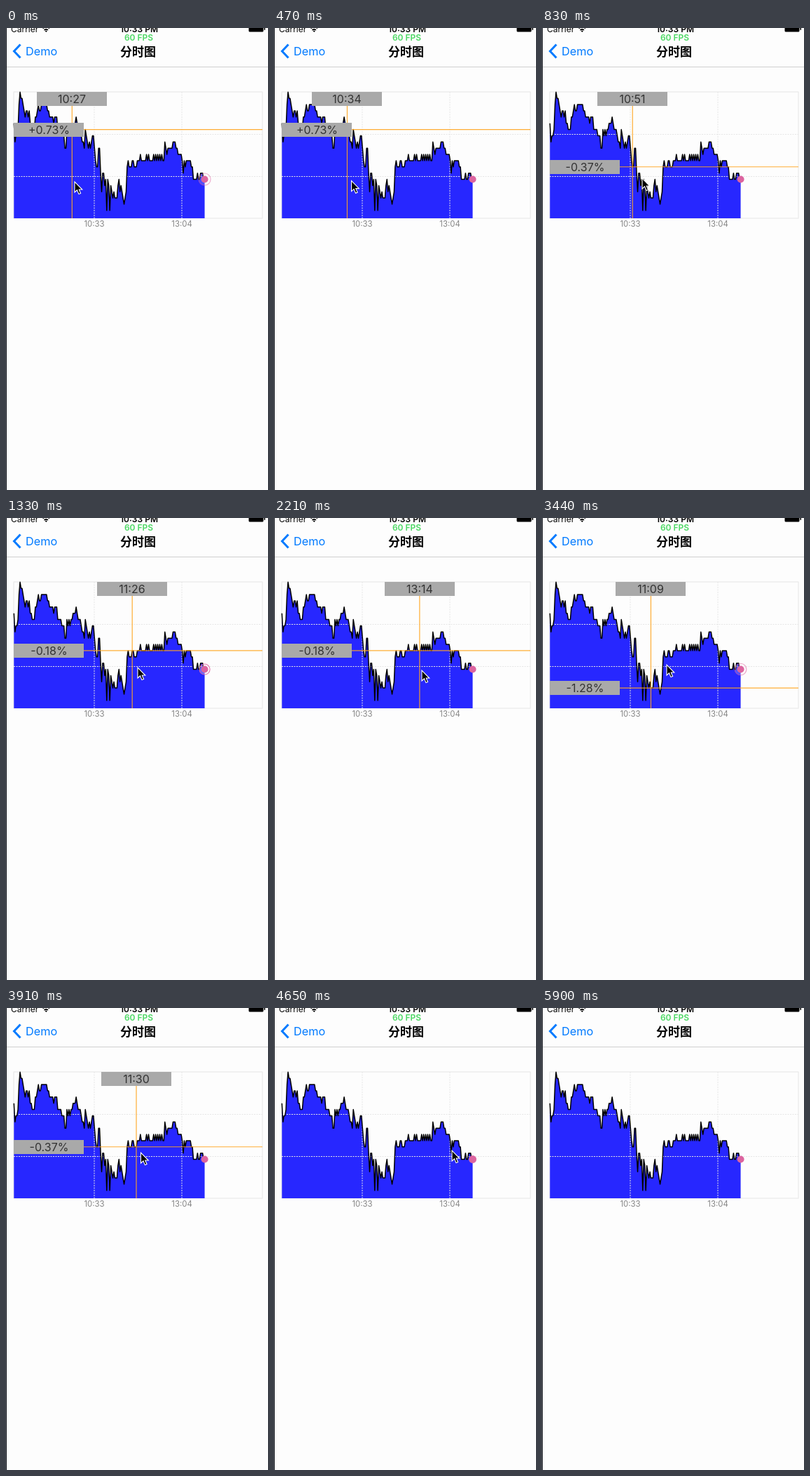
An HTML page for the animation above (6040 ms loop, 374 by 658 pixels).

```html
<!DOCTYPE html>
<html lang="zh">
<head>
<meta charset="utf-8">
<title>分时图</title>
<style>
  html, body { margin: 0; width: 100%; height: 100%; overflow: hidden; background: #fdfdfd; }
  svg { display: block; width: 374px; height: 658px; font-family: Inter, Roboto, sans-serif; }
  .mid { text-anchor: middle; }
  .axis { font-size: 11.4px; fill: #868686; }
  .grid { stroke: #e6e6e6; stroke-dasharray: 2 1.5; }
  .tag rect { fill: #a9a9a9; }
  .tag text { font-size: 16px; fill: #333; }
  .hair { stroke: #ffa51f; stroke-width: 1.2; opacity: .9; }
</style>
</head>
<body>
<svg viewBox="0 0 374 658">
  <rect width="374" height="658" fill="#fdfdfd"/>
  <rect y="55" width="374" height="1" fill="#cfcfcf"/>

  <text x="7" y="6" font-size="12">Carrier</text>
  <g fill="none" stroke="#000" stroke-width="1.6">
    <path d="M52.5 0.5Q57.5 -3 62 0.5M54.5 3Q57.3 0.8 60 3"/>
  </g>
  <path d="M55.7 4.2Q57.3 3 58.9 4.2L57.3 6Z"/>
  <text class="mid" x="190" y="6" font-size="12" font-weight="600">10:33 PM</text>
  <rect x="346.5" y="-4" width="21" height="9.5" rx="1.5"/>
  <rect x="368.5" y="-1" width="1.5" height="4" rx=".7"/>
  <text class="mid" x="189.5" y="18" font-size="12" font-weight="600" fill="#4cd964">60 FPS</text>

  <path d="M20.5 23.5L11.5 33L20.5 42.5" fill="none" stroke="#007aff" stroke-width="3"/>
  <text x="28" y="39" font-size="16.3" fill="#007aff">Demo</text>
  <text class="mid" x="188.5" y="39.5" font-size="17" font-weight="600"
        style="font-family:'Noto Sans CJK SC','Noto Sans CJK',sans-serif">分时图</text>

  <rect x="11" y="91" width="355" height="180" fill="none" stroke="#e6e6e6"/>
  <path id="area" fill="#2727ff"/>
  <path class="grid" d="M11 151.5H366M11 211.5H366M126 91V271M251 91V271"/>
  <path id="line" fill="none" stroke="#000" stroke-width="1.5" stroke-linejoin="round"/>
  <text class="axis mid" x="126" y="283">10:33</text>
  <text class="axis mid" x="251" y="283">13:04</text>

  <circle id="ring" fill="#fff" fill-opacity=".35" stroke="#e06aa4" stroke-width="1.2"/>
  <circle id="dot" r="5" fill="#dc649f"/>

  <g id="cross">
    <path id="vert" class="hair" d="M0 91V271"/>
    <path id="horiz" class="hair" d="M11 0H366"/>
    <g id="timeTag" class="tag"><rect x="-50" y="91" width="100" height="20"/><text class="mid" y="107"></text></g>
    <g id="pctTag" class="tag"><rect x="11" y="-10" width="100" height="20"/><text class="mid" x="61.5" y="5.8"></text></g>
  </g>

  <path id="cursor" d="M0 0V15L3.5 11.8L6 17.6L8.6 16.5L6.2 11H10.8Z" stroke="#fff" stroke-width="1.1"/>
  <rect width="1" height="658" fill="#15181f"/>
</svg>
<script>
const LOOP = 6040;
const $ = id => document.getElementById(id);
const move = (el, x, y) => el.setAttribute('transform', `translate(${x} ${y})`);

// Price ticks per minute; [level, count] is a flat stretch.
const levels = [
  6, 3, 4, 4, 5, 9, 11, 10, 10, 9, 8, 7, 8, 8, 7, 8, 6, 6, [5, 3],
  7, 7, 8, 9, 8, 8, [9, 6], 8, 8, [7, 4], 6, [7, 3], [5, 4], [4, 3],
  2, 2, 5, 4, 5, 4, 5, 5, [6, 3], 7, 6, [5, 3], 4, 3, 3, 2,
  5, 4, 3, 2, 3, 2, 3, 4, 4, 2, 0, -1, -1, 2, 2, -2, -5, -2, -2, -4, -3, -8,
  -3, -4, -8, -4, -5, -6, -5, [-6, 3], -4, -3, -5, -4, -5, -6, -7, -6, -5,
  -1, 0, [-1, 3], 0, 0, [-1, 3], [0, 27],
  3, 2, 1, [2, 5], [3, 3], 2, 2, [1, 4], 0, -2, 0, -1, [0, 5], -1, -1,
  [-3, 4], -2, -3, -3, [-2, 3], -3, -3
].flatMap(e => Array.isArray(e) ? Array(e[1]).fill(e[0]) : e);
// Small midday wobble
for (const i of [124, 130, 132]) levels[i] = 1;
for (let i = 137; i < 147; i += 2) levels[i] = 1;

const px = i => 11.3 + 1.456 * i;
const py = level => 188.9 - 8.87 * level;
const last = levels.length - 1;

const line = 'M' + levels.map((v, i) => `${px(i).toFixed(2)} ${py(v).toFixed(2)}`).join('L');
$('line').setAttribute('d', line);
$('area').setAttribute('d', `${line}V271H${px(0)}Z`);
for (const id of ['ring', 'dot']) move($(id), px(last), py(levels[last]));

// Screen updates: start, end, steps
const runs = [
  [60, 650, 10], [710, 1270, 11], [1330, 1920, 11], [2040, 2610, 12],
  [2670, 3260, 12], [3320, 3910, 11], [3970, 4150, 4], [4340, 4340, 1],
  [4480, 5050, 11], [5110, 5650, 11], [5740, 5740, 1]
];
function snap(t) {
  let at = 0;
  for (const [start, end, n] of runs) {
    if (t < start) break;
    const gap = n > 1 ? (end - start) / (n - 1) : 1;
    at = start + Math.min(n - 1, Math.floor((t - start + 4) / gap)) * gap;
  }
  return at;
}

const minuteKeys = [
  [0, 57], [650, 67], [822, 81], [1330, 116], [1920, 132], [2195, 135],
  [2610, 126], [3220, 82], [3438, 99], [3800, 128], [4150, 103]
];
const cursorKeys = [
  [0, 98, 219], [650, 116, 217], [822, 143, 214], [1330, 188, 213],
  [1920, 206, 216], [2195, 211, 217], [2610, 194, 214], [3220, 128, 212],
  [3438, 178, 209], [3800, 206, 206], [4150, 163, 206], [4423, 163, 206],
  [4651, 254, 203], [4800, 276, 42], [5050, 267, 436], [5650, 376, 660]
];
function sample(keys, t, col) {
  const n = keys.findIndex(k => k[0] > t);
  if (n < 0) return keys[keys.length - 1][col];
  const a = keys[n - 1], b = keys[n];
  return a[col] + (b[col] - a[col]) * (t - a[0]) / (b[0] - a[0]);
}

function clock(i) {
  const m = 570 + i + (i > 120 ? 89 : 0);
  return `${Math.floor(m / 60)}:${String(m % 60).padStart(2, '0')}`;
}
function percent(level) {
  const p = (level - 1) * 0.18333;
  return (p > 0 ? '+' : '') + p.toFixed(2) + '%';
}

function drawCross(t) {
  const on = t < 4340;
  $('cross').style.display = on ? '' : 'none';
  if (!on) return;
  const i = Math.round(sample(minuteKeys, t, 1));
  const x = px(i), y = py(levels[i]);
  move($('vert'), x, 0);
  move($('timeTag'), Math.round(x), 0);
  move($('horiz'), 0, y);
  move($('pctTag'), 0, Math.round(y));
  $('timeTag').lastChild.textContent = clock(i);
  $('pctTag').lastChild.textContent = percent(levels[i]);
}

function drawRing(t) {
  const period = 690;
  const phase = (t - 1330 + 130 + 2 * period) % period - 130;
  $('ring').setAttribute('r', Math.min(10.5, 7.5 + phase * 0.02));
  $('ring').setAttribute('opacity', Math.max(0, Math.min(0.85, 0.85 - phase / 150)));
}

function frame(now) {
  const t = snap(now % LOOP);
  drawCross(t);
  drawRing(t);
  move($('cursor'), sample(cursorKeys, t, 1), sample(cursorKeys, t, 2));
  requestAnimationFrame(frame);
}
const begin = performance.now();
frame(0);
function tick() { frame(performance.now() - begin); }
</script>
</body>
</html>
```
